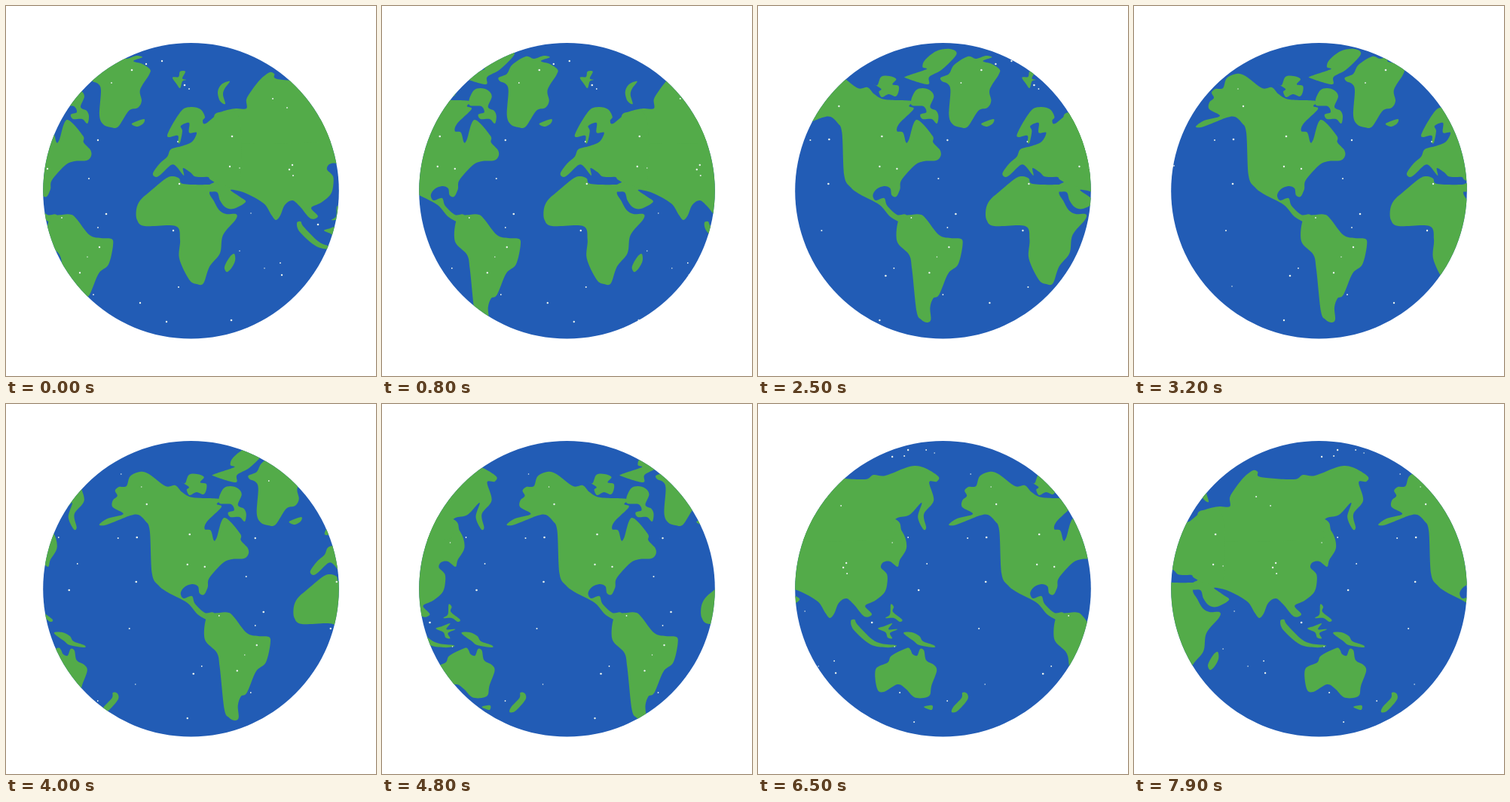
Animation of 491 by 491 pixels, one loop 8000 ms. Source, as an HTML page:

```html
<!DOCTYPE html>
<html lang="en">
<head>
<meta charset="utf-8">
<title>Turning globe</title>
<style>
html, body { margin: 0; width: 100%; height: 100%; overflow: hidden; background: #fff; }
svg { display: block; width: 100vw; height: 100vh; }
</style>
</head>
<body>
<svg viewBox="0 0 491 491">
  <defs>
    <clipPath id="disc"><circle cx="245.5" cy="245.3" r="196.3"/></clipPath>
    <g id="map"><g id="land" fill="#53ab49"/><g id="specks" fill="#e9f2ee"/></g>
  </defs>
  <g clip-path="url(#disc)">
    <rect width="491" height="491" fill="#225cb5"/>
    <g id="strip">
      <use href="#map" x="-601"/><use href="#map"/><use href="#map" x="601"/>
    </g>
  </g>
</svg>
<script>
const NS = 'http://www.w3.org/2000/svg';
const byId = id => document.getElementById(id);
const parse = text => text.trim().split(/\s+/).map(p => p.split(',').map(Number));

function add(parent, tag, attrs) {
  const el = document.createElementNS(NS, tag);
  for (const key in attrs) el.setAttribute(key, attrs[key]);
  parent.appendChild(el);
}

// Closed smooth curve through the points.
function smooth(pts) {
  const at = i => pts[(i + pts.length) % pts.length];
  const handle = (i, sign) => [0, 1].map(k =>
    (at(i)[k] + sign * (at(i + 1)[k] - at(i - 1)[k]) / 6.2).toFixed(1));
  return 'M' + pts[0] + pts.map((_, i) =>
    `C${handle(i, 1)} ${handle(i + 1, -1)} ${at(i + 1)}`).join('') + 'Z';
}

function land(dx, text) {
  add(byId('land'), 'path', { d: smooth(parse(text).map(([x, y]) => [x + dx, y])) });
}

function specks(dx, text) {
  parse(text).forEach(([x, y]) =>
    add(byId('specks'), 'circle', { cx: x + dx, cy: y, r: 0.75 + (x * 7 + y * 3) % 5 * 0.14 }));
}

// Southern Asia
land(192, `88,247 92,258 99,267 110,269 126,260 118,253 106,244 125,248 150,262 160,277
  166,284 172,278 178,264 188,258 198,266 212,282 222,279 213,268 226,261 238,251 242,240
  242,226 234,217 237,210 246,209 256,216 259,207 268,190 262,169 240,150 100,150 84,170
  86,226 80,236 70,239 76,246`);
// Northern Asia
land(192, `240,180 250,166 249,158 256,151 272,147 288,131 283,150 290,166 294,164 291,146
  304,128 298,104 308,103 310,96 290,84 272,83 240,95 224,94 212,100 168,97 164,90 158,88
  146,97 134,112 127,124 127,136 113,136 95,140 84,147 90,180`);
// Europe
land(0, `195,222 204,209 214,200 219,190 233,186 247,180 253,168 243,168 243,155 232,159
  234,166 231,181 228,181 228,172 214,172 232,140 245,134 258,137 264,147 261,152 265,156
  287,141 310,150 310,235 288,238 272,231 268,227 258,227 250,226 245,221 235,215 236,225
  226,213 219,211 206,223 199,227`);
// Africa
land(0, `212,229 190,247 178,258 173,270 174,284 184,292 225,292 231,310 230,335 243,363
  253,369 262,368 270,346 284,328 288,304 305,283 305,276 292,276 283,271 276,259 270,247
  280,234 268,237 235,236 230,229 222,226`);
land(0, '297,333 303,329 304,338 299,348 293,353 290,346');
// North America
land(-209, `124,160 135,152 156,146 142,137 142,128 148,122 145,115 150,110 160,109 165,96
  178,90 190,93 212,109 225,108 234,117 248,124 283,126 280,133 286,137 267,156 264,166
  272,168 276,181 280,177 290,151 311,172 312,181 321,191 322,199 316,205 300,206 288,211
  270,231 268,243 263,253 257,251 255,242 247,239 237,243 232,251 236,258 247,255 251,265
  264,277 276,277 282,292 257,281 241,264 215,250 203,241 194,225 191,168 185,155 176,147
  165,148 145,156 131,161`);
// South America
land(-209, `267,282 264,312 280,330 284,350 290,405 296,416 304,420 309,416 308,400 312,388
  320,383 332,355 345,343 351,318 349,309 335,308 320,304 303,283 296,277 284,277`);
// Arctic islands
land(-83, `196,95 207,90 214,78 232,67 243,70 256,66 264,68 252,73 264,77 274,84 273,91
  261,111 263,126 258,135 246,139 232,160 222,161 212,157 207,145 209,112 205,103 198,100`);
land(-83, '217,64 208,57 190,60 175,72 172,81 177,84 151,93 151,96 179,104 181,94 198,84');
land(-83, `157,124 163,112 172,109 182,112 187,120 182,134 190,139 193,146 191,156 184,150
  172,150 169,144 177,141 173,133 158,132`);
land(-129, `152,103 158,105 163,94 174,93 183,97 178,104 186,106 186,114 182,120 173,117
  164,121 160,114 163,110`);
land(0, '167,156 183,150 182,156 174,160');
land(0, '221,95 229,94 231,87 238,87 234,96 239,98 234,100 231,109 226,103');
land(0, '297,100 286,104 281,114 284,126 291,130 288,118 290,110');
// Pacific islands
land(192, '194,288 199,286 203,293 222,312 235,318 253,320 253,322 240,323 220,319 198,300');
land(192, '230,298 238,295 249,291 244,299 256,299 246,304 249,311 243,310 240,303');
land(192, '247,266 251,269 250,276 262,286 259,289 251,284 240,284 246,279');
land(192, '264,304 275,303 285,308 290,315 304,320 304,323 285,320 278,315');
land(192, `227,352 243,343 248,334 268,324 273,326 276,332 282,334 286,325 291,327 294,340
  304,346 308,354 301,374 299,386 291,390 278,389 267,378 256,372 238,382 229,378`);
land(192, '291,402 302,400 301,406');
land(192, '342,383 348,384 349,392 336,407 328,409 330,402 341,390');

specks(0, `186,77 207,73 237,105 243,110 228,180 122,178 110,229 133,276 122,294 116,383
  178,394 213,419 229,373 222,298 310,325 299,417 325,275 300,173 297,213 310,215 380,211
  376,217 381,225 354,123 373,135 343,348 364,341 366,357 230,236 74,281 98,354 108,333
  124,320 167,85 140,102 35,173 32,213 55,216 40,358 51,348`);
specks(-209, `149,178 173,236 174,177 164,298 172,372 95,212 84,247 180,110 187,133 153,93
  122,394 241,417`);
specks(-409, `294,61 305,65 265,69 270,61 249,70 222,290 259,383 252,322 270,177 249,184
  278,422`);

// The map advances every 80 ms and is shown every 100 ms.
function draw(ms) {
  const shown = Math.floor(ms % 8000 / 100);
  const shift = Math.floor(shown * 1.25) * 4.175;
  byId('strip').setAttribute('transform', `translate(${shift.toFixed(2)} 0)`);
}

function tick() {
  draw(performance.now());
  requestAnimationFrame(tick);
}
tick();
</script>
</body>
</html>
```
